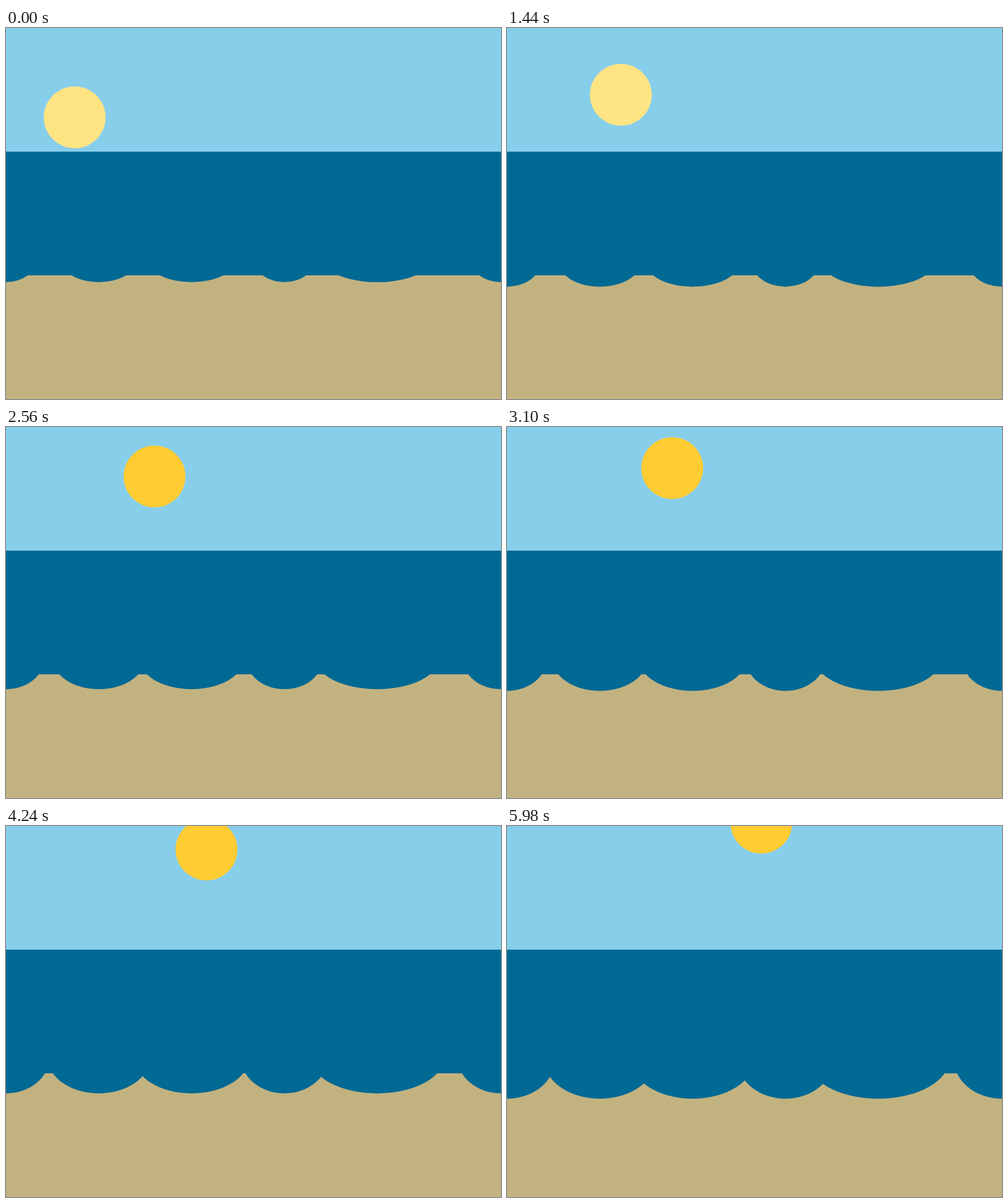
An HTML page with a canvas for the animation above (6 s loop, 800 by 600 pixels).

```html
<!DOCTYPE html>
<html lang="en">
<head>
<meta charset="utf-8">
<title>Beach sunrise</title>
<style>
  html, body { margin: 0; width: 100%; height: 100%; overflow: hidden; }
  canvas { display: block; }
</style>
</head>
<body>
<canvas id="stage" width="800" height="600"></canvas>
<script>
const ctx = document.getElementById('stage').getContext('2d');
const STEP = 20, STEPS = 300;

// Centre x and starting width of each wave
const waves = [[0, 75], [150, 100], [300, 120], [450, 75], [600, 150], [800, 75]];

function rect(color, y, h) {
  ctx.fillStyle = color;
  ctx.fillRect(0, y, 800, h);
}

function ellipse(color, x, y, w, h) {
  ctx.fillStyle = color;
  ctx.beginPath();
  ctx.ellipse(x, y, w / 2, h / 2, 0, 0, 2 * Math.PI);
  ctx.fill();
}

function draw(time) {
  const step = Math.floor(time / STEP) % STEPS;
  const sunX = step ? 112 + step : 111; // the first step is twice as long
  const swell = sunX * 0.2;

  rect('#87ceeb', 0, 200);
  ellipse(sunX < 200 ? '#ffe484' : '#ffcc33', sunX, 200 - sunX / 2, 100, 100);
  rect('#006994', 200, 200);
  rect('#c2b280', 400, 200);
  for (const [x, width] of waves) ellipse('#006994', x, 375, width + swell, 50 + swell);
}

function tick() {
  draw(performance.now());
  requestAnimationFrame(tick);
}
tick();
</script>
</body>
</html>
```
